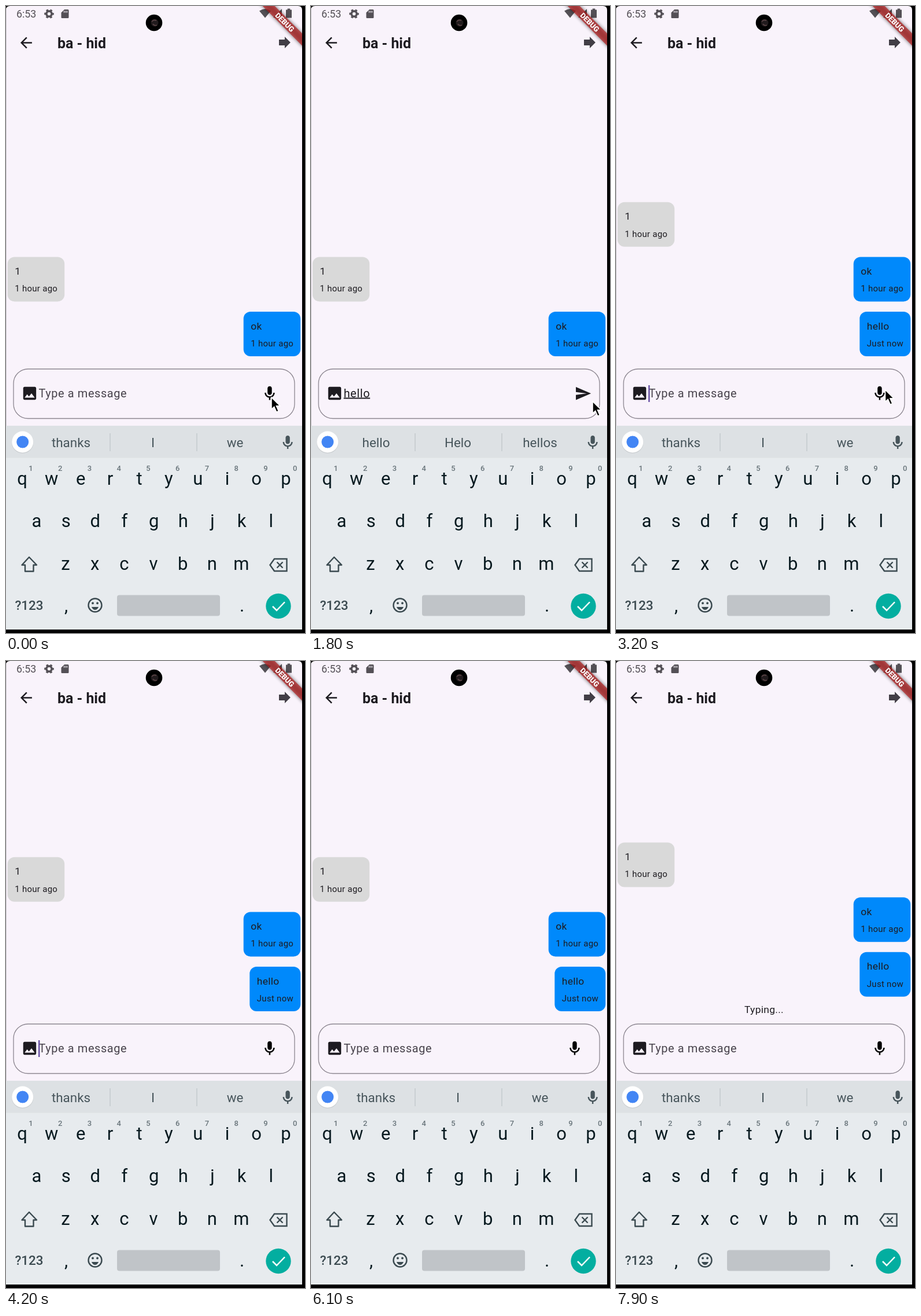
An HTML page that plays this animation: 517x1083 px, repeating every 8000 ms.

```html
<!DOCTYPE html>
<html lang="en">
<head>
<meta charset="utf-8">
<title>Chat</title>
<style>
  html, body { margin: 0; width: 100%; height: 100%; overflow: hidden; background: #000; }
  svg { display: block; width: 517px; height: 1083px; }
  text { font-family: Roboto, sans-serif; fill: #1d1b20; white-space: pre; }
  .mid { text-anchor: middle; }
  .body { font-size: 17.4px; letter-spacing: .31px; }
  .small { font-size: 14.95px; letter-spacing: .31px; }
  .field { font-size: 19.9px; letter-spacing: .62px; }
  #typed { text-decoration: underline; text-decoration-thickness: 1px; }
  .key { font-size: 31px; fill: #07191f; }
  .hint { font-size: 13px; font-weight: 500; fill: #68747a; }
  .word { font-size: 22.4px; fill: #47555b; }
  .line { fill: none; stroke: #3b4a50; stroke-width: 2.4; }
</style>
</head>
<body>
<svg viewBox="0 0 517 1083">
  <defs>
    <path id="mic" d="M12 14c1.66 0 3-1.34 3-3V5c0-1.66-1.34-3-3-3S9 3.34 9 5v6c0 1.66 1.34 3 3 3zM17 11c0 2.76-2.24 5-5 5s-5-2.24-5-5H5c0 3.53 2.61 6.43 6 6.92V21h2v-3.08c3.39-.49 6-3.39 6-6.92h-2z"/>
    <filter id="blur" x="-30%" y="-80%" width="160%" height="260%"><feGaussianBlur stdDeviation="3"/></filter>
    <clipPath id="screen"><path d="M0 1077V7Q0 0 7 0H505Q512 0 512 7V1077z"/></clipPath>
  </defs>
  <rect width="517" height="1083"/>
  <g clip-path="url(#screen)">
    <rect width="512" height="1077" fill="#f9f3fb"/>

    <!-- status bar -->
    <g fill="#545056">
      <text x="18" y="20" font-size="17.8" style="fill:#545056">6:53</text>
      <circle cx="74.500" cy="13.500" r="4.600" fill="none" stroke="#545056" stroke-width="3.600"/>
      <circle cx="74.500" cy="13.500" r="7" fill="none" stroke="#545056" stroke-width="2.600" stroke-dasharray="3.665" stroke-dashoffset="1.830"/>
      <path d="M101 6h6q1.500 0 1.500 1.500v12q0 1.500-1.500 1.500H97q-1.500 0-1.500-1.500V11.500z"/>
      <path d="M100.500 8.500v3M103 8.500v3M105.500 8.500v3" stroke="#f9f3fb" stroke-width="1.200"/>
      <path d="M438 8.500Q448 1.500 458 8.500L448 20.500z"/>
      <path d="M477 5V20H462z"/>
      <path d="M484 6.500h2.700V4.500h4.600v2h2.700V20.500h-10z"/>
    </g>
    <circle cx="256" cy="29" r="14.300"/>
    <circle cx="257" cy="29" r="6.500" fill="#211b1d"/>
    <path d="M252 27q3-4 8-2M254 31q3 4 7 2" fill="none" stroke="#5b4446" stroke-width="1.600"/>

    <!-- app bar -->
    <path d="M20 11H7.830l5.590-5.590L12 4l-8 8 8 8 1.410-1.410L7.830 13H20z" fill="#1d1b20" transform="translate(20 48.500) scale(1.245)"/>
    <text x="89" y="72.500" font-size="24.900" font-weight="700">ba - hid</text>
    <path d="M12 8V4l8 8-8 8v-4H4V8z" fill="#423e46" transform="translate(467 48) scale(1.245)"/>

    <g id="list"></g>
    <text id="typing" class="mid body" x="256" y="607.500">Typing...</text>

    <!-- message field -->
    <rect x="13" y="627" width="486" height="85.500" rx="25" fill="none" stroke="#8c8690" stroke-width="1.300"/>
    <path d="M21 19V5c0-1.100-.9-2-2-2H5c-1.100 0-2 .9-2 2v14c0 1.100.9 2 2 2h14c1.100 0 2-.9 2-2zM8.500 13.500l2.500 3.010L14.500 12l4.500 6H5z" fill="#1d1b20" transform="translate(26 654) scale(1.245)"/>
    <text id="prompt" class="field" x="56.500" y="675.500" style="fill:#48434c">Type a message</text>
    <text id="typed" class="field" x="56.500" y="675.500"></text>
    <rect id="caret" y="655" width="2.400" height="29" fill="#6750a4"/>
    <use id="voice" href="#mic" transform="translate(441 654.300) scale(1.245)"/>
    <path id="send" d="M2.010 21L23 12 2.010 3 2 10l15 2-15 2z" fill="#1d1b20" transform="translate(455.500 654.300) scale(1.245)"/>

    <!-- keyboard -->
    <rect y="725" width="512" height="352" fill="#e7ebee"/>
    <rect y="725" width="512" height="55.500" fill="#dde1e4"/>
    <circle cx="28.700" cy="754" r="18.700" fill="#c9cdd0"/>
    <circle cx="28.700" cy="753" r="18.500" fill="#fff"/>
    <circle cx="28.700" cy="753" r="10.500" fill="#4285f4"/>
    <path d="M180 738v31M330 738v31" stroke="#c0c6ca" stroke-width="1.300"/>
    <use href="#mic" fill="#47555b" transform="translate(472.500 739.500) scale(1.220)"/>
    <g id="keys"></g>
    <path class="line" d="M40 952L53 965.500H47.500V976.500H33V965.500H27.500z" stroke-linejoin="round"/>
    <path class="line" d="M464 955H485.500V976H464L456.500 965.500zM468.500 960.500l10 10m0-10l-10 10"/>
    <text class="mid" x="40" y="1043" font-size="22.400" font-weight="500" style="fill:#3b4a50">?123</text>
    <circle class="line" cx="154" cy="1035" r="11.500"/>
    <path d="M148 1038h12q-2 5-6 5t-6-5z" fill="#3b4a50"/>
    <circle cx="150" cy="1031.500" r="1.900" fill="#3b4a50"/>
    <circle cx="158" cy="1031.500" r="1.900" fill="#3b4a50"/>
    <rect x="192" y="1017.500" width="178" height="36" rx="4" fill="#c0c4c8"/>
    <circle cx="471" cy="1036.500" r="21.700" fill="#03aea0"/>
    <path d="M461 1037l7 7 14-14.500" fill="none" stroke="#fff" stroke-width="2.500"/>

    <!-- corner ribbon -->
    <g transform="translate(512 -2) rotate(45)">
      <rect x="-55" y="34.900" width="110" height="14.900" fill="#000" opacity=".55" filter="url(#blur)"/>
      <rect x="-55" y="34.900" width="110" height="14.900" fill="#b71c1c" opacity=".68"/>
      <text class="mid" y="47" font-size="12.700" font-weight="900" style="fill:#fff">DEBUG</text>
    </g>
    <path d="M.5 0V725" stroke="#cfcad1"/>
  </g>
  <path id="pointer" d="M0 0V20.500L4.700 16.200 8.700 25.200 12.300 23.600 8.400 14.800H14.800z" stroke="#fff" stroke-width="1.500"/>
</svg>
<script>
const $ = id => document.getElementById(id);
const LOOP = 8000, STEP = 100;

function add(parent, tag, attrs, text = '') {
  const el = document.createElementNS('http://www.w3.org/2000/svg', tag);
  for (const k in attrs) el.setAttribute(k, attrs[k]);
  el.textContent = text;
  return parent.appendChild(el);
}

function bubble(x, width, fill, text, when) {
  const g = add($('list'), 'g', {});
  add(g, 'rect', { x, width, height: 77, rx: 12, fill });
  add(g, 'text', { x: x + 12.5, y: 30.5, class: 'body' }, text);
  add(g, 'text', { x: x + 12.5, y: 59.8, class: 'small' }, when);
  return g;
}
const bubbles = [
  bubble(2.7, 98.5, '#d9d9d9', '1', '1 hour ago'),
  bubble(410.7, 98.5, '#0089fb', 'ok', '1 hour ago'),
  bubble(421.3, 88, '#0089fb', 'hello', 'Just now')
];

const rows = [['qwertyuiop', 28, 827], ['asdfghjkl', 53, 899.5], ['zxcvbnm', 103, 973.5], [',', 104, 1045.5], ['.', 408, 1045.5]];
for (const [chars, x0, y] of rows)
  [...chars].forEach((c, i) => add($('keys'), 'text', { x: x0 + 50.65 * i, y, class: 'mid key' }, c));
for (let i = 0; i < 10; i++)
  add($('keys'), 'text', { x: 43 + 50.75 * i, y: 803, class: 'mid hint' }, (i + 1) % 10);
const words = [112.5, 254, 396].map(x => add($('keys'), 'text', { x, y: 762, class: 'mid word' }));

const WORD = 'hello', SENT = 2500, POSTED = 3000, REPLYING = 6500;
const keyTimes = [700, 900, 1000, 1100, 1300];
const idle = ['thanks', 'I', 'we'];
const hints = [idle, ['h', 'how', 'have'], ['he', 'her', 'hey'], ['hel', 'help', 'hello'],
  ['hell', 'hello', 'hells'], ['hello', 'Helo', 'hellos']];

// time, x, y
const route = [[0, 459, 676], [1300, 459, 676], [1700, 487, 683], [1800, 487, 683], [2050, 502, 690],
  [2400, 465.5, 663], [3300, 465.5, 663], [3600, 490, 1040]];

function along(t) {
  const i = Math.max(1, route.findIndex(p => p[0] > t));
  const [a, b] = [route[i - 1], route[i]];
  const k = (t - a[0]) / (b[0] - a[0]), e = k * k * (3 - 2 * k);
  return [a[1] + (b[1] - a[1]) * e, a[2] + (b[2] - a[2]) * e];
}

function show(id, on) { $(id).style.display = on ? '' : 'none'; }
function write(el, text) { if (el.textContent !== text) el.textContent = text; }

function draw(t) {
  const count = keyTimes.filter(k => k <= t).length;
  const text = t < SENT ? WORD.slice(0, count) : '';
  write($('typed'), text);
  show('prompt', !text);
  show('voice', !text);
  show('send', text);

  const suggested = t < 2800 ? hints[count] : idle;
  words.forEach((el, i) => write(el, suggested[i]));

  const beat = t % 1000, busy = t >= keyTimes[0] && t < 1750;
  show('caret', busy || (beat >= 150 && beat < 650));
  $('caret').setAttribute('x', 56 + (text ? $('typed').getComputedTextLength() : 0));

  const posted = t >= POSTED, replying = t >= REPLYING;
  bubbles[2].style.display = posted ? '' : 'none';
  const bottom = 528 - (replying ? 25.2 : 0), last = posted ? 2 : 1;
  bubbles.forEach((g, i) => g.setAttribute('transform', `translate(0 ${bottom - 94.6 * (last - i)})`));
  show('typing', replying);

  const here = t < 3600;
  show('pointer', here);
  if (here) $('pointer').setAttribute('transform', `translate(${along(t)})`);
}

function tick() {
  draw(Math.floor(performance.now() % LOOP / STEP) * STEP);
  requestAnimationFrame(tick);
}
tick();
</script>
</body>
</html>
```
